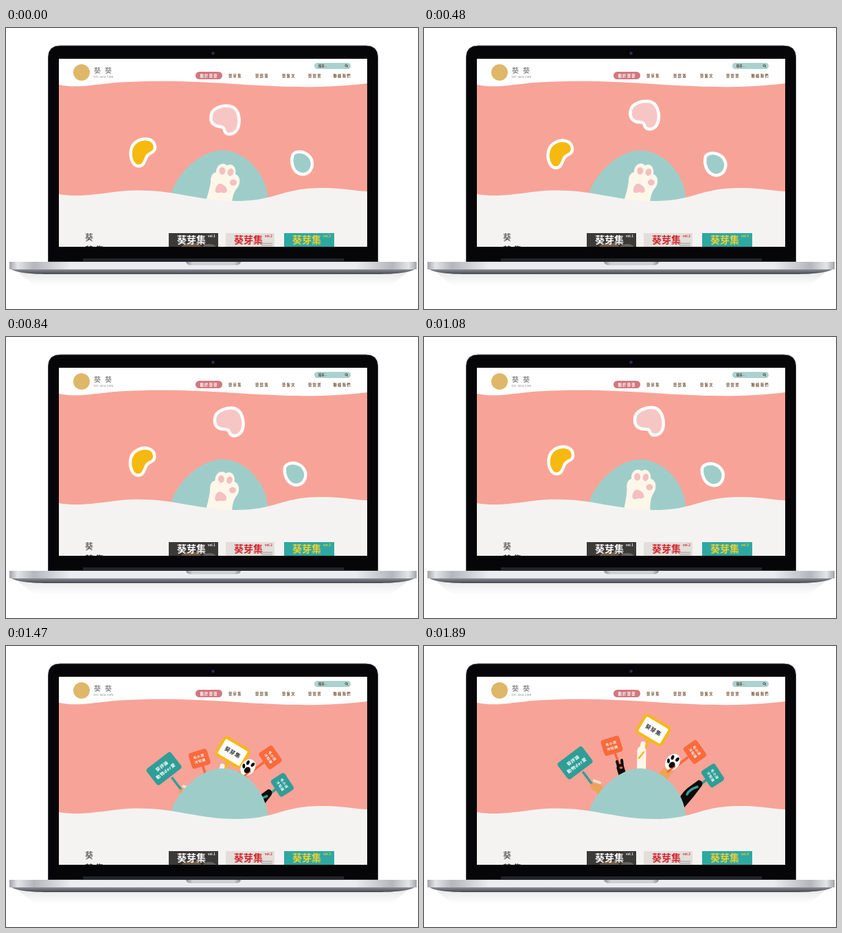
Write an HTML page that moves like this. It is 600 by 411 pixels and loops after 1.92 s.

```html
<!DOCTYPE html>
<html lang="zh-Hant">
<head>
<meta charset="utf-8">
<title>葵葵</title>
<style>
html, body { margin: 0; width: 100%; height: 100%; overflow: hidden; background: #fff; }
svg { display: block; width: 600px; height: 411px; }
text { font-family: "Noto Sans CJK TC", "Noto Sans CJK", "Noto Sans", sans-serif; }
.petal { stroke: #fff; stroke-width: 4.5; }
.nav { font-size: 5.3px; font-weight: 700; letter-spacing: 1.3px; fill: #76553a; }
.board { font-weight: 700; text-anchor: middle; fill: #fff; }
.title { font-size: 14px; font-weight: 900; }
.small { font-size: 4.5px; font-weight: 700; }
.round { stroke-linecap: round; fill: none; }
</style>
</head>
<body>
<svg viewBox="0 0 600 411">
  <defs>
    <clipPath id="screen"><rect x="77" y="45" width="449" height="275"/></clipPath>
    <linearGradient id="metal">
      <stop offset="0" stop-color="#a2a4aa"/><stop offset=".02" stop-color="#e4e5e8"/>
      <stop offset=".06" stop-color="#b4b6bc"/><stop offset=".15" stop-color="#ebecef"/>
      <stop offset=".85" stop-color="#ebecef"/><stop offset=".94" stop-color="#b4b6bc"/>
      <stop offset=".98" stop-color="#e4e5e8"/><stop offset="1" stop-color="#a2a4aa"/>
    </linearGradient>
    <linearGradient id="under" x2="0" y2="1">
      <stop offset="0" stop-color="#a3a5ac"/><stop offset="1" stop-color="#43454f"/>
    </linearGradient>
    <linearGradient id="notch">
      <stop offset="0" stop-color="#8b8d93"/><stop offset=".12" stop-color="#cfd0d4"/>
      <stop offset=".88" stop-color="#cfd0d4"/><stop offset="1" stop-color="#8b8d93"/>
    </linearGradient>
    <linearGradient id="shade" x2="0" y2="1">
      <stop offset="0" stop-color="#dcdcde"/><stop offset="1" stop-color="#fff"/>
    </linearGradient>
  </defs>

  <!-- laptop -->
  <path d="M18 358H584L560 377H42Z" fill="url(#shade)" opacity=".6"/>
  <path d="M61.500 342V43Q61.500 26 79 26H524Q541.500 26 541.500 43V342Z" fill="#060608" stroke="#3c3e46"/>
  <rect x="112" y="337" width="380" height="5" fill="#22242a"/>
  <circle cx="301.500" cy="37" r="2.500" fill="#1d2140"/><circle cx="301.500" cy="37" r="1" fill="#3d4478"/>
  <path d="M5 351H598C592 357 572 360 540 360H62C30 360 11 357 5 351Z" fill="url(#under)"/>
  <rect x="5" y="342" width="593" height="11" fill="url(#metal)"/>
  <path d="M262 342H342Q341 347 334 347H270Q263 347 262 342Z" fill="url(#notch)"/>

  <g clip-path="url(#screen)">
    <rect x="77" y="45" width="449" height="275" fill="#f8a398"/>
    <g id="signs"></g>
    <path d="M234 262L240 243C248 215 282 179 315 179C349 179 379 214 381 247V262Z" fill="#9ecdc9"/>

    <path id="pink" class="petal" fill="#f6c6c5" d="M-20-8C-18-19 0-23 11-19C23-13 22 7 17 15C11 23 0 22-1 15C-2 8-8 11-14 8C-20 5-22 0-20-8Z"/>
    <path id="gold" class="petal" fill="#f5b910" d="M-17-3C-15-16-1-22 9-19C19-16 20-5 15-1C11 2 7 2 5 8C2 16 0 20-6 20C-14 20-19 8-17-3Z"/>
    <path id="aqua" class="petal" fill="#9ecdc9" d="M-14-10C-12-18 0-18 7-13C15-8 17 2 13 9C9 17-1 19-8 13C-14 8-16-2-14-10Z"/>

    <g id="paw">
      <path d="M286 275C289 254 296 242 298 225C298 216 301 212 306 211C306 200 316 195 322 201C330 197 336 204 334 214C342 216 342 229 336 235C330 242 328 255 328 275Z" fill="#fdf7ea"/>
      <g fill="#f5bfc0">
        <ellipse cx="315" cy="209" rx="4.500" ry="5.500"/>
        <ellipse cx="327" cy="211" rx="4.300" ry="5.500" transform="rotate(20 327 211)"/>
        <ellipse cx="331" cy="226" rx="5" ry="4.500"/>
        <path d="M305 236C306 230 310 226 314 228C319 230 324 236 321 240C317 243 314 239 310 241C306 242 304 239 305 236Z"/>
      </g>
    </g>

    <!-- page -->
    <path d="M77 45H526V81C470 88 420 87 350 83C300 80 240 75 165 79.500C130 82 105 89 77 83Z" fill="#fff"/>
    <path d="M77 320V243C105 248 130 243 165 239C235 232 275 253 335 253C395 253 400 234 460 234C490 234 505 238 526 239V320Z" fill="#f4f3f1"/>

    <circle cx="110" cy="65" r="12" fill="#dfb768"/>
    <text x="128" y="66" font-size="10" fill="#666" letter-spacing="6">葵葵</text>
    <text x="127.500" y="72.500" font-size="4" fill="#777" letter-spacing=".5">tiri-lala.com</text>
    <rect x="449" y="51" width="53" height="9" rx="4.500" fill="#abd2ce"/>
    <text x="455" y="57" font-size="4.200" font-weight="700" fill="#554738">搜尋...</text>
    <g class="round" stroke="#4b4238" stroke-width=".9"><circle cx="495.500" cy="55" r="1.600"/><path d="M496.700 56.300L498 57.600"/></g>
    <rect x="276" y="64" width="39" height="11" rx="5.500" fill="#d2777f"/>
    <g id="nav"></g>

    <text x="115" y="311" font-size="12" fill="#333">葵</text>
    <text x="115" y="329" font-size="12" fill="#333" letter-spacing="3">芽集</text>
    <g id="covers"></g>
  </g>
</svg>
<script>
const $ = id => document.getElementById(id);
const TEAL = '#2f9e96', ORANGE = '#f96a3c', GOLD = '#f5b910';
const BLACK = '#0d0b0a', TAN = '#eda35c', CREAM = '#fdf7ea';

const line = (d, color, width) =>
  `<path class="round" d="${d}" stroke="${color}" stroke-width="${width}"/>`;
const dot = (x, y, rx, ry, fill, turn = 0) =>
  `<ellipse cx="${x}" cy="${y}" rx="${rx}" ry="${ry}" fill="${fill}" transform="rotate(${turn} ${x} ${y})"/>`;

$('nav').innerHTML = [[282.500, '關於葵葵'], [324, '葵芽集'], [363, '葵部落'], [402, '葵藝文'], [440, '葵實習'], [476.500, '聯絡我們']]
  .map(([x, s], i) => `<text class="nav" x="${x}" y="72"${i ? '' : ' style="fill:#fff"'}>${s}</text>`).join('');

$('covers').innerHTML = [
  [237, 72, '#3c3a37', '#fff'],
  [320, 71, '#e2dfdb', '#d3222b'],
  [405, 73, '#2fa8a2', '#f3d02f']
].map(([x, w, back, ink], i) =>
  `<rect x="${x}" y="300" width="${w}" height="20" fill="${back}"/>` +
  (i ? '' : dot(270, 322, 15, 8, '#75604b') + dot(296, 321, 10, 5, '#69655f')) +
  `<text class="title" x="${x + 12}" y="314.500" fill="${ink}">葵芽集</text>` +
  `<text class="small" x="${x + 57}" y="306" fill="${ink}">vol.${i + 1}</text>` +
  (i == 1 ? '<path d="M372 315H388M372 318H388" stroke="#9a9692"/>' : '')).join('');

// at: resting centre, dir: way out of the mound, far: starting depth
const fact = ['毛小孩', '冷知識'];
const signs = [
  { at: [220, 171], turn: -37, size: [45, 30], dir: [-.77, -.64], far: 95, swing: -.05, color: TEAL,
    font: 6.500, words: ['葵評論', '動物der愛'], stick: 'M232 185L250 209',
    arm: line('M252 206L275 232', TAN, 12) + line('M245 204L248 209', TAN, 6) + line('M248 197L256 200', '#fbe3cb', 4) },
  { at: [273.500, 146], turn: -17, size: [28, 24], dir: [-.4, -.92], far: 150, swing: 0, color: ORANGE,
    font: 5, words: fact, stick: 'M278 156L287 182',
    arm: line('M286 178L297 215', BLACK, 11) + line('M281 169L283 176M288 167L289 176', BLACK, 4) + dot(287, 178, 2.500, 1.800, ORANGE) },
  { at: [334, 123], turn: 31, size: [45, 33], dir: [.12, -.99], far: 240, swing: 0, color: GOLD,
    font: 8, words: ['葵芽集'], stick: 'M327 137L315 165',
    arm: line('M317 153L316 220', CREAM, 13) + line('M319 143L317 154', CREAM, 7) +
      line('M320 155L313 164', GOLD, 2.500) },
  { at: [394.500, 155], turn: 55, size: [29, 24], dir: [.77, -.64], far: 90, swing: .05, color: ORANGE,
    font: 5, words: fact, stick: 'M384 163L370 174',
    arm: line('M356 181L330 215', TAN, 15) + dot(362, 170, 10, 13, '#fff', 35) + line('M365 176L355 184', ORANGE, 3) +
      dot(361, 174, 4, 5, BLACK, 50) + dot(356, 168, 2, 3.500, BLACK) + dot(362, 163, 2.200, 3.500, BLACK, 20) + dot(369, 166, 2.200, 3.500, BLACK, 40) },
  { at: [420.500, 189.500], turn: 57, size: [29, 24], dir: [.8, -.6], far: 165, swing: 0, color: TEAL,
    font: 5, words: fact, stick: 'M411 196L398 206',
    arm: `<path d="M355 250L371 224Q378 211 389 204L400 196Q407 197 405 204L392 221L364 254Z" fill="${BLACK}"/>` +
      line('M383 217Q386 210 398 206', TEAL, 3.500) }
];

$('signs').innerHTML = signs.map(s => {
  const [w, h] = s.size, [x, y] = s.at, framed = s.color == GOLD;
  const words = s.words.map((word, i) => {
    const row = (i - (s.words.length - 1) / 2) * s.font * 1.4 + s.font * .36;
    return `<text class="board" y="${row}" font-size="${s.font}" letter-spacing=".6"${framed ? ' style="fill:#333"' : ''}>${word}</text>`;
  }).join('');
  const inset = framed ? 2 : 0;
  return `<g>${line(s.stick, s.color, 3.500)}${s.arm}<g transform="translate(${x} ${y}) rotate(${s.turn})">
    <rect x="${-w / 2 + inset}" y="${-h / 2 + inset}" width="${w - 2 * inset}" height="${h - 2 * inset}" rx="4"
      fill="${framed ? '#fff' : s.color}" stroke="${s.color}" stroke-width="${inset * 2}"/>${words}</g></g>`;
}).join('');
const signNodes = [...$('signs').children];

const place = (id, x, y, turn) => $(id).setAttribute('transform', `translate(${x} ${y}) rotate(${turn})`);
const clamp = v => Math.max(0, Math.min(1, v));

function draw(t) {
  const p = Math.min(t / 1080, 1);
  const sway = Math.sin(p * Math.PI / 2);
  const out = Math.max(0, (t - 1090) / 230) ** 2;

  place('pink', 319 + 9 * p ** 1.7, 134.5 - 10.5 * sway - 90 * out, -8 * p);
  place('gold', 199 - Math.sin(p * Math.PI) - 113 * out, 182 + 2.5 * Math.sin(p * Math.PI * 1.25) - 94 * out, 0);
  place('aqua', 431 - 10.5 * sway + 94 * out, 197.5 + 3.5 * p - 76 * out, -12 * p);
  const drop = 80 * clamp((t - 1090) / 170) ** 2;
  $('paw').setAttribute('transform', `translate(0 ${drop - 4 * p ** 5}) rotate(${-6 * p ** 4} 309 250)`);

  const rest = (1 - clamp((t - 1200) / 690)) ** 4;
  signs.forEach((s, i) => {
    const depth = s.far * rest;
    signNodes[i].setAttribute('visibility', t < 1200 ? 'hidden' : 'visible');
    signNodes[i].setAttribute('transform',
      `translate(${-s.dir[0] * depth} ${-s.dir[1] * depth}) rotate(${s.swing * depth} ${s.at})`);
  });
}

const start = performance.now();
function tick() {
  const t = (performance.now() - start) % 1920;
  draw(Math.floor(t / 30) * 30);
  requestAnimationFrame(tick);
}
tick();
</script>
</body>
</html>
```
